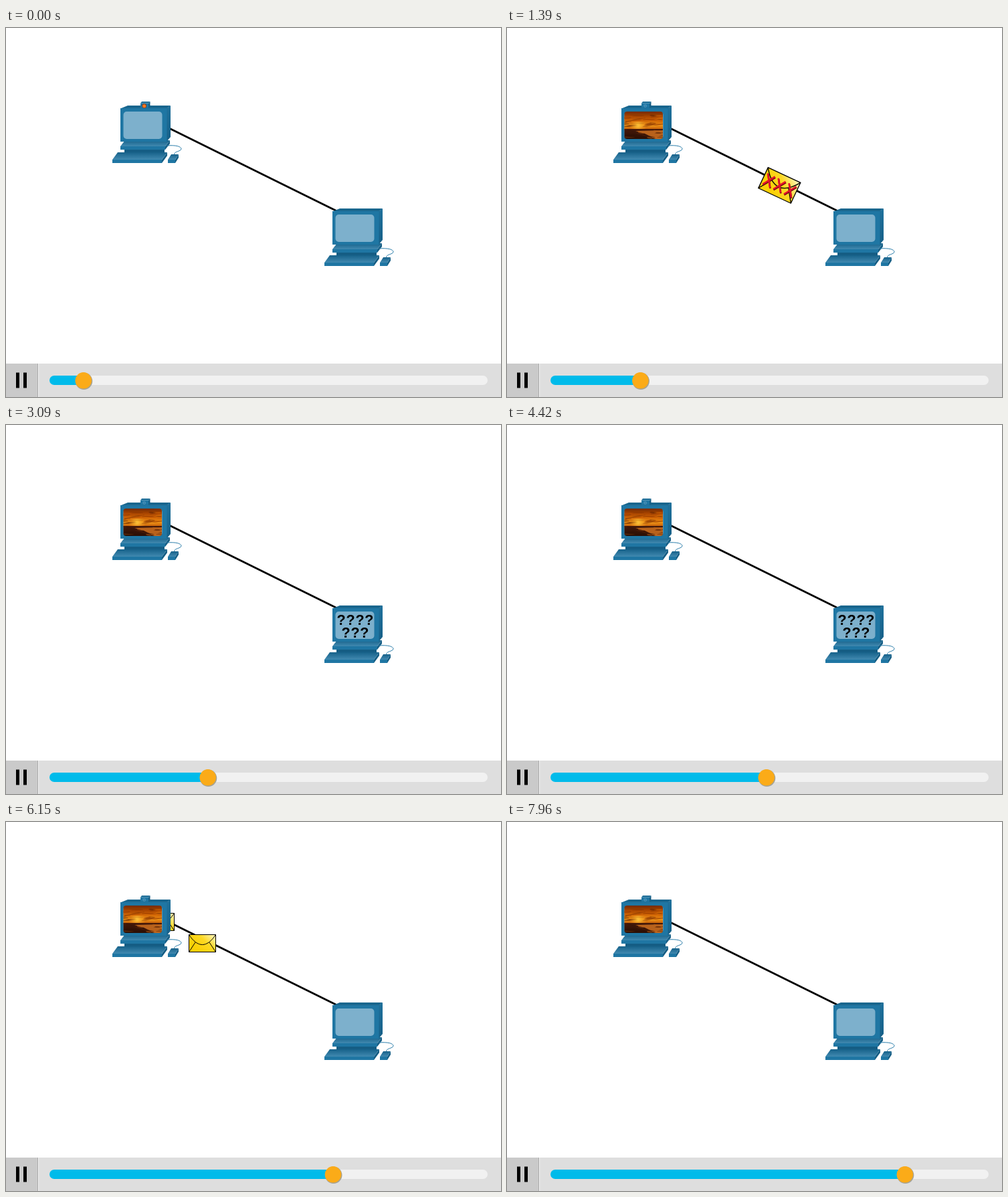
An HTML page with a canvas that plays this animation: 740 px wide and 552 px high, repeating every 8 s.

```html
<!DOCTYPE html>
<html lang="en">
<head>
<meta charset="utf-8">
<title>Message encoding</title>
<style>
html, body { margin: 0; width: 740px; height: 552px; overflow: hidden; background: #fff; }
canvas { display: block; }
</style>
</head>
<body>
<canvas id="stage" width="740" height="552"></canvas>
<script>
const ctx = document.getElementById('stage').getContext('2d');
const LOOP = 8000;

const clamp = v => Math.max(0, Math.min(1, v));

// The slider runs steadily, a little faster in the middle stretch.
function sliderX(t) {
  if (t < 3090) return 116 + t * 0.0602;
  if (t < 4420) return 302 + (t - 3090) * 0.0647;
  return 388 + (t - 4420) * 0.0585;
}

function poly(fill, ...p) {
  ctx.beginPath();
  for (let i = 0; i < p.length; i += 2) ctx.lineTo(p[i], p[i + 1]);
  ctx.closePath();
  ctx.fillStyle = fill;
  ctx.fill();
}

function box(fill, x, y, w, h, r = 0) {
  ctx.beginPath();
  ctx.roundRect(x, y, w, h, r);
  ctx.fillStyle = fill;
  ctx.fill();
}

function disc(fill, x, y, r) {
  ctx.beginPath();
  ctx.arc(x, y, r, 0, Math.PI * 2);
  ctx.fillStyle = fill;
  ctx.fill();
}

function line(color, width, draw) {
  ctx.beginPath();
  draw();
  ctx.strokeStyle = color;
  ctx.lineWidth = width;
  ctx.stroke();
}

function ramp(x0, y0, x1, y1, ...colors) {
  const g = ctx.createLinearGradient(x0, y0, x1, y1);
  colors.forEach((c, i) => g.addColorStop(i / (colors.length - 1), c));
  return g;
}

const BLUE = '#1f76a3', DARK = '#155d84', TOP = '#17628a', SHINE = '#4189b0';

// Flat block: sloping top face, front strip and right side
function slab(x, y, w, slant, depth, h) {
  const r = x + w, b = y + depth;
  poly(DARK, r, b, r + slant, y, r + slant, y + h, r, b + h);
  poly(ramp(0, y, 0, b, TOP, SHINE), x, b, x + slant, y, r + slant, y, r, b);
  box(BLUE, x, b, w, h);
}

function computer(dx, dy) {
  ctx.save();
  ctx.translate(dx, dy);
  slab(159, 186, 74, 8, 11, 5);
  box(DARK, 177, 180, 60, 6);
  slab(171, 168, 67, 7, 9, 5);
  // monitor
  poly(ramp(0, 116, 0, 170, '#1f719c', '#165f87'), 240, 120, 246, 116, 246, 163, 240, 170);
  poly('#19668e', 171, 120.5, 182, 116, 246, 116, 240, 120.5);
  box(BLUE, 171, 120, 69.5, 50);
  box('#7db0cc', 175.5, 125, 58, 41, 5);
  // mouse
  line('#2a7daa', 1, () => {
    ctx.moveTo(240, 176);
    ctx.bezierCurveTo(254, 175, 262, 177, 262, 181);
    ctx.bezierCurveTo(261, 185, 252, 184, 251.5, 189);
  });
  slab(242, 189, 11, 5, 8, 5);
  ctx.restore();
}

function camera(lit) {
  poly(DARK, 213, 112.5, 215.5, 110, 215.5, 117, 213, 119);
  poly('#1d6d97', 201, 112.5, 203, 110, 215.5, 110, 213, 112.5);
  box(BLUE, 201, 112.5, 12, 7);
  disc(lit ? '#8a3a1c' : '#4f93b8', 206.7, 116.6, lit ? 3.3 : 2.3);
  disc(lit ? '#f87a20' : '#2a7daa', 206.7, 116.7, lit ? 2.5 : 1.2);
}

function randomizer(seed) {
  return () => (seed = seed * 16807 % 2147483647) / 2147483647;
}

function streaks(n, y, h, slope, tones, rnd) {
  for (let i = 0; i < n; i++) {
    ctx.beginPath();
    ctx.ellipse(176 + rnd() * 58, y + rnd() * h, 4 + rnd() * 9, 0.4 + rnd() * 0.9,
      slope * (rnd() - 0.3), 0, Math.PI * 2);
    ctx.fillStyle = tones[Math.floor(rnd() * tones.length)];
    ctx.fill();
  }
}

function sunset() {
  const rnd = randomizer(41);
  ctx.save();
  ctx.beginPath();
  ctx.roundRect(175.5, 125, 57.5, 41, 4);
  ctx.clip();
  box(ramp(0, 125, 0, 153, '#742a00', '#a84400', '#d06505', '#ee9418', '#b64c05'), 175, 125, 59, 28);
  streaks(34, 125, 23, -0.35, ['#5c200080', '#8a350090', '#e0760a90', '#b84f0080'], rnd);
  const glow = ctx.createRadialGradient(196, 146, 1, 196, 146, 13);
  glow.addColorStop(0, '#ffc93cd0');
  glow.addColorStop(1, '#ffa52000');
  box(glow, 180, 140, 34, 12);
  box(ramp(0, 151, 0, 166, '#45190a', '#2a0e04'), 175, 151, 59, 15);
  poly('#b8621c', 192, 154, 234, 153, 234, 166, 222, 166, 206, 158);
  streaks(14, 153, 12, 0.4, ['#5a220590', '#c96a1c70', '#30120490'], rnd);
  ctx.restore();
}

function envelope(x, y) {
  ctx.save();
  ctx.translate(x, y);
  ctx.fillStyle = ramp(-6, 10, 17, -14, '#fbd005', '#fdd822', '#fff6bd');
  ctx.fillRect(-20, -13, 40, 26);
  line('#000', 1, () => {
    ctx.rect(-20, -13, 40, 26);
    ctx.moveTo(-20, -13);
    ctx.bezierCurveTo(-7, 7, 7, 7, 20, -13);
    for (const side of [-1, 1]) {
      ctx.moveTo(side * 20, 13);
      ctx.lineTo(side * 10.5, -1.5);
    }
  });
  ctx.restore();
}

function cross(x) {
  const stroke = (color, w, o) => line(color, w, () => {
    for (const side of [-1, 1]) {
      ctx.moveTo(x - side * 6 + o, o - 9);
      ctx.lineTo(x + side * 6 + o, o + 9);
    }
  });
  stroke('#6d0712', 2.6, 0.9);
  stroke('#e5132b', 2.5, 0);
}

function codedEnvelope(x, y) {
  ctx.save();
  ctx.translate(x, y);
  ctx.rotate(25.1 * Math.PI / 180);
  ctx.save();
  ctx.scale(1.34, 1.31);
  envelope(0, 0);
  ctx.restore();
  [-17.5, 0, 17.5].forEach(cross);
  ctx.restore();
}

function questions(alpha) {
  ctx.save();
  ctx.globalAlpha = alpha;
  ctx.font = 'bold 21.5px "Liberation Sans", Arial, sans-serif';
  ctx.letterSpacing = '0.8px';
  ctx.textAlign = 'center';
  ctx.fillStyle = '#000';
  ctx.fillText('????', 522.4, 298.5);
  ctx.fillText('???', 522.4, 317.5);
  ctx.restore();
}

function controls(x) {
  box('#dedede', 0, 502, 740, 50);
  box('#cacaca', 0, 502, 47, 50);
  box('#a9a9a9', 47, 502, 1, 50);
  box('#f4f4f4', 48, 502, 1, 50);
  box('#000', 15, 515.5, 5, 23);
  box('#000', 26, 515.5, 5, 23);
  box('#f1f1f1', 65, 520, 655, 14, 7);
  box('#00bbea', 65, 520, x - 65, 14, [7, 0, 0, 7]);
  disc('#a5a294', x + 0.4, 528.2, 12.8);
  disc('#fbab18', x - 0.3, 527.3, 12.2);
}

function render(t) {
  box('#fff', 0, 0, 740, 552);
  line('#000', 2.8, () => {
    ctx.moveTo(240, 148);
    ctx.lineTo(504, 278.4);
  });

  if (t > 700 && t < 2100) {
    const d = (t - 1390) * 0.3;
    codedEnvelope(407 + d, 235.3 + d * 0.477);
  }
  for (let i = 0; i < 3; i++) {
    const d = (t - 6150) * 0.235 - i * 62.6;
    if (d > -88 && d < 230) {
      envelope(Math.floor(293.5 + d) + 0.5, Math.floor(181.7 + d * 0.521) + 0.5);
    }
  }

  computer(0, 0);
  computer(317, 154);
  camera(t < 140 || (t > 285 && t < 605));
  if (t > 605) sunset();
  questions(clamp((t - 2700) / 300) * clamp((4810 - t) / 310));
  controls(sliderX(t));
}

const start = performance.now();
function tick() {
  render((performance.now() - start) % LOOP);
  requestAnimationFrame(tick);
}
tick();
</script>
</body>
</html>
```
